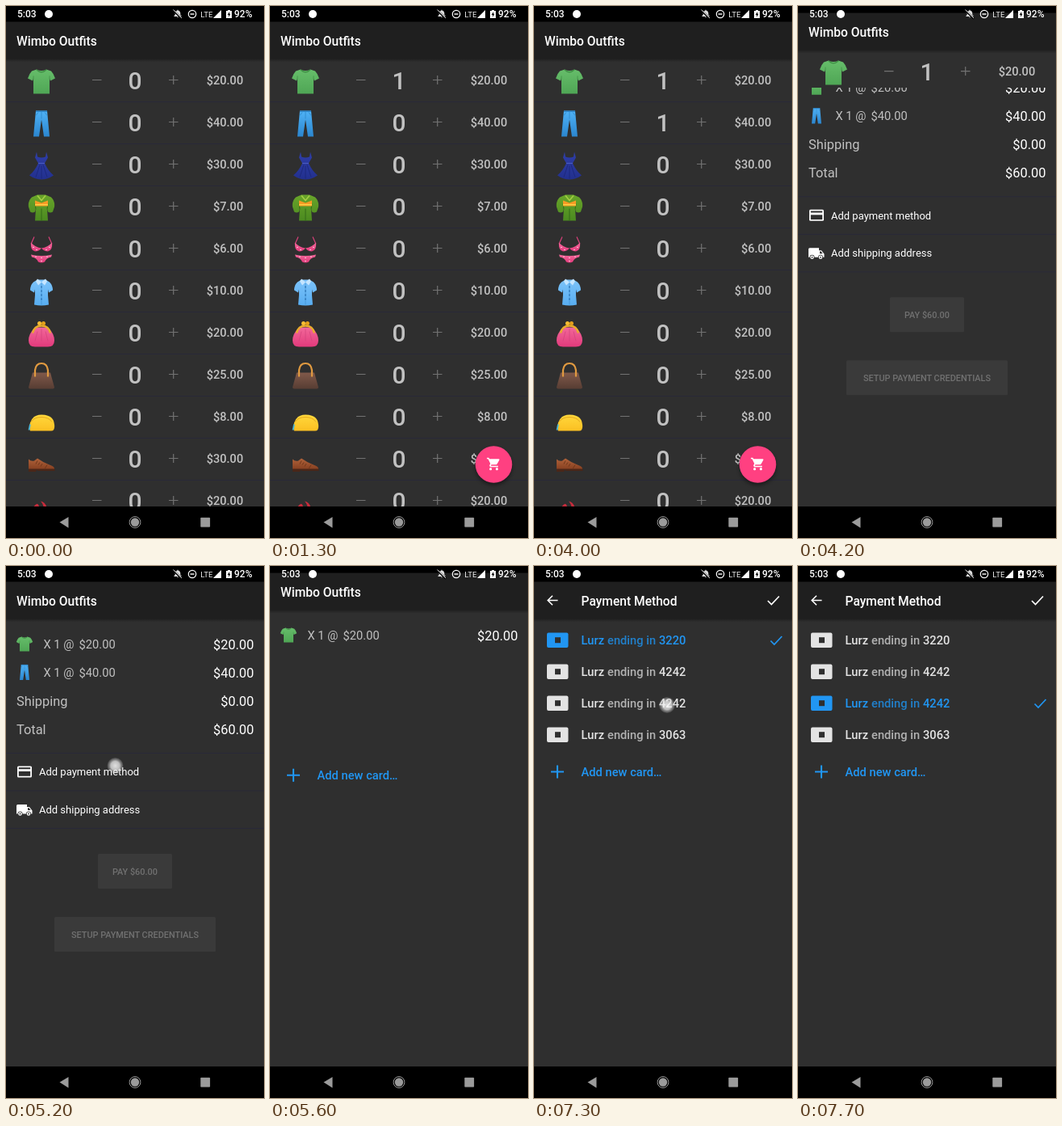
Recreate the animation shown at these times as an HTML page. Size 320 by 658 pixels, loop 8 s.

```html
<!DOCTYPE html>
<html lang="en">
<head>
<meta charset="utf-8">
<title>Shop checkout</title>
<style>
html, body { margin: 0; width: 100%; height: 100%; overflow: hidden; background: #000; }
svg { display: block; width: 100%; height: 100%; }
text { font-family: Roboto, sans-serif; white-space: pre; }
</style>
</head>
<body>
<svg id="stage" viewBox="0 0 320 658" xmlns="http://www.w3.org/2000/svg"></svg>
<script>
const SHOP = 'Wimbo Outfits', CARD = 'Lurz';
const BLUE = '#2196f3', RULE = '#292938';

// Markup helpers
const text = (x, y, s, size, fill = '#fff', weight = 400, anchor = 'start', extra = '') =>
  `<text x="${x}" y="${y}" font-size="${size}" fill="${fill}" font-weight="${weight}" text-anchor="${anchor}" ${extra}>${s}</text>`;
const rect = (x, y, w, h, fill, r = 0) =>
  `<rect x="${x}" y="${y}" width="${w}" height="${h}" rx="${r}" fill="${fill}"/>`;
const circle = (x, y, r, fill) => `<circle cx="${x}" cy="${y}" r="${r}" fill="${fill}"/>`;
const path = (d, fill) => `<path d="${d}" fill="${fill}"/>`;
const line = (d, stroke, w = 1) => `<path d="${d}" fill="none" stroke="${stroke}" stroke-width="${w}"/>`;
const at = (x, y, body, scale = 1) => `<g transform="translate(${x} ${y}) scale(${scale})">${body}</g>`;
const group = (id, body) => `<g id="${id}">${body}</g>`;
const rule = y => rect(0, y, 320, 1, RULE);

const grad = (id, a, b) =>
  `<linearGradient id="${id}" x2="0" y2="1"><stop stop-color="${a}"/><stop offset="1" stop-color="${b}"/></linearGradient>`;
const defs = `<defs>
  ${grad('green', '#66bd6a', '#4fa655')}${grad('denim', '#4fb2f6', '#2b86cf')}
  ${grad('navy', '#2f3ea8', '#22308e')}${grad('leaf', '#69a52a', '#4b8a20')}
  ${grad('sky', '#7cc3fa', '#58adf0')}${grad('rose', '#f2689a', '#e23a7c')}
  ${grad('brown', '#80594a', '#573d33')}${grad('gold', '#ffd83c', '#fbbf22')}
  ${grad('tan', '#b0623a', '#853f20')}
  <linearGradient id="shade" x2="0" y2="1"><stop stop-color="#000" stop-opacity=".3"/><stop offset="1" stop-color="#000" stop-opacity="0"/></linearGradient>
  <radialGradient id="touch">
    <stop stop-color="#fff" stop-opacity=".85"/><stop offset=".55" stop-color="#eee" stop-opacity=".75"/>
    <stop offset=".72" stop-color="#ddd" stop-opacity=".5"/><stop offset="1" stop-color="#ccc" stop-opacity=".12"/>
  </radialGradient>
  <filter id="soft" x="-50%" y="-50%" width="200%" height="200%"><feGaussianBlur stdDeviation="2.6"/></filter>
  <clipPath id="clipCart"><rect id="cutCart" width="320" height="658"/></clipPath>
  <clipPath id="clipPay"><rect id="cutPay" width="320" height="658"/></clipPath>
</defs>`;

// Clothes, each centred on 0,0
const tshirt = path('M-6-15Q0-12 6-15L12-13Q15-10 17-4L11-1 10-4V15H-10V-4L-11-1-17-4Q-15-10-12-13Z', 'url(#green)') +
  line('M-6-14.500Q0-9 6-14.500', '#3f9045', 1.3) + line('M-10-3V-7M10-3V-7', '#3f9045', .8);
const jeans = path('M-7-16H7L10 16H3L0-5-3 16H-10Z', 'url(#denim)') +
  line('M-7-15.300H7', '#2477b8', 1.2) + line('M0-15V-6M-7-10L-4-14M7-10L4-14', '#2f88ca', .8);
const dress = path('M-6-17L-5-11Q0-9 5-11L6-17 8-10 4-3Q8 6 15 12 8 17 0 17T-15 12Q-8 6-4-3L-8-10Z', 'url(#navy)') +
  line('M-4-3H4', '#4b5cc4', 1) + line('M-2-1L-7 14M2-1L7 14M0 0V16', '#1b2676', .8);
const kimono = path('M-5-16H5L12-13Q17-8 16-1L14 5Q11 7 8 5L7 1 8 16H-8L-7 1-8 5Q-11 7-14 5L-16-1Q-17-8-12-13Z', 'url(#leaf)') +
  line('M-5-15L0-9 5-15', '#a5cf45', 1.6) + line('M0 1V16M-7 2L-8-5M7 2L8-5', '#356b18', 1) +
  path('M-8-9L0-6 8-9V-2H-8Z', '#f79a24') + rect(-8, -4.5, 16, 1.4, '#ffcf45');
const bikini = line('M-9-16L-13-7M9-16L13-7', '#d8417a', 1.2) +
  path('M-13-9Q-8-3 0-2-3 2-8 2-14 1-13-9ZM13-9Q8-3 0-2 3 2 8 2 14 1 13-9Z', 'url(#rose)') +
  path('M-13 6Q0 9 13 6L12 9Q6 10 4 15 0 17-4 15-6 10-12 9Z', 'url(#rose)') +
  [[-10, -3], [-6, 0], [10, -3], [6, 0], [-7, 8.5], [0, 10], [7, 8.5], [0, 14]]
    .map(([x, y]) => circle(x, y, .8, '#ffd5e4')).join('');
const blouse = path('M-5-15H5L10-12Q14-8 14-2L9 1 8-3V4L9 16Q0 18-9 16L-8 4V-3L-9 1-14-2Q-14-8-10-12Z', 'url(#sky)') +
  path('M-5-16L0-12-4-8-7-13ZM5-16L0-12 4-8 7-13Z', '#c5e5ff') +
  line('M0-11V16', '#4190d0', .7) + [-6, -1, 4, 9].map(y => circle(0, y, .9, '#2c72b2')).join('');
const purse = path('M-8-8H8Q16 0 16 8T8 16H-8Q-16 16-16 8T-8-8Z', 'url(#rose)') +
  line('M-11-1Q-9-10 0-10T11-1', '#e8ab2c', 2.4) + line('M-5-3L-8 9M5-3L8 9M0-6V9', '#d2437c', .7) +
  circle(-2.5, -13, 2.5, '#f9bd32') + circle(2.5, -13, 2.5, '#e4a01c');
const handbag = line('M-8 0V-7Q-7-15.500 0-15.500T8-7V0', '#e09a40', 2.2) +
  path('M-11-4H11L16 14Q16 16 14 16H-14Q-16 16-16 14Z', 'url(#brown)') +
  line('M-8 1V-5M8 1V-5', '#e09a40', 2.2);
const pouch = path('M-14 16Q-16 12-14 6-11-4 0-4 15-4 16 8 17 16 12 16Z', 'url(#gold)') +
  line('M-13 5Q-9-1 0-1T13 5', '#e0a41c', .9) + line('M-14 8L-15.500 15', '#4ab6d8', 1.8);
const shoe = path('M-16-1Q-13 2-9 1L-5-2Q2 3 10 6 17 8 16 12H-16Z', 'url(#tan)') +
  path('M-16 11H16.500V13.500H-4L-6 12.500-7 14.500H-16Z', '#4a2618') +
  line('M-5 1L-7 5M-2 3L-4 6M1 4.500L-1 8M7 6L4 11', '#6d3519', .9);
const heel = path('M-9 5Q-6 1-4 3L-2 8H-10Z', '#c62c3c') + path('M-1-1Q4 0 6 5V8H3Q2 2-1-1Z', '#c62c3c');

const goods = [[tshirt, 20], [jeans, 40], [dress, 30], [kimono, 7], [bikini, 6], [blouse, 10],
  [purse, 20], [handbag, 25], [pouch, 8], [shoe, 30], [heel, 20]];
const money = n => '$' + n.toFixed(2);

const page = (body, bar) => rect(0, 0, 320, 658, '#2f2f2f') + body +
  rect(0, 19, 320, 46.5, '#1f1f1f') + rect(0, 65.5, 320, 4, 'url(#shade)') + bar + rect(0, 0, 320, 19.5, '#000');
const title = (x, s) => text(x, 49, s, 15.6, '#fff', 500);

// Shop list
const shopRow = ([icon, price], i) => {
  const y = 92 + 52 * i;
  return at(44, y + 1.5, icon) +
    line(`M107 ${y - .5}H118.500M202 ${y - .5}H213.500M207.700 ${y - 6}V${y + 5}`, '#727272', 1.2) +
    text(160, y + 11, '0', 30, '#c1c1c1', 500, 'middle', `id="count${i}"`) +
    text(294.2, y + 5, money(price), 14.6, '#c1c1c1', 500, 'end') + rule(y + 26);
};
const cart = path('M1 2V4H3L6.600 11.600 5.250 14Q4.500 16 7 17H19V15H7.400L8.100 13H15.550Q16.700 13 17.300 12L20.900 5.500Q21.200 4 20 4H5.200L4.300 2Z', '#fff') +
  circle(7, 20, 2, '#fff') + circle(17, 20, 2, '#fff');
const fab = `<g filter="url(#soft)" opacity=".45">${circle(0, 3, 22.5, '#000')}</g>` +
  circle(0, 0, 22.8, '#ff4081') + at(-9.3, -9.9, cart, .778);
const shop = page(goods.map(shopRow).join('') + group('fab', fab), title(13, SHOP));

// Checkout
const sumRow = (y, value) => text(307.5, y, money(value), 16.4, '#fff', 400, 'end');
const itemRow = (y, icon, price) => at(23, y - 6, icon, .6) + text(46.5, y - .5, 'X 1 @', 14.7, '#c1c1c1') +
  text(90.5, y - .5, money(price), 14.7, '#c1c1c1') + sumRow(y, price);
const button = (x, y, w, label) => rect(x, y, w, 43, '#3a3a3a', 1.5) +
  text(x + w / 2, y + 25.5, label, 10.9, '#717171', 500, 'middle');
const cardIcon = rect(14, 247.5, 18, 14, '#fff', 1.6) + rect(15.8, 249.2, 14.4, 2, '#2f2f2f') + rect(15.8, 254, 14.4, 5.8, '#2f2f2f');
const truck = path('M13 296.500Q13 295 14.500 295H26V298H29L32.500 302.500V306.500H13Z', '#fff') +
  path('M27 299.300H28.600L30.600 302H27Z', '#2f2f2f') +
  [17.5, 28].map(x => circle(x, 306.5, 3, '#2f2f2f') + circle(x, 306.5, 2.3, '#fff') + circle(x, 306.5, .9, '#2f2f2f')).join('');
const checkout = page(
  itemRow(102.5, tshirt, 20) + itemRow(137.5, jeans, 40) +
  text(13, 172.5, 'Shipping', 16.4, '#c1c1c1') + sumRow(172.5, 0) +
  text(13, 207.5, 'Total', 16.4, '#c1c1c1') + sumRow(207.5, 60) +
  [231, 277.5, 324].map(rule).join('') +
  cardIcon + text(41, 259.3, 'Add payment method', 13) +
  truck + text(41, 306, 'Add shipping address', 13) +
  button(114, 356, 92, 'PAY $60.00') + button(60, 434, 200, 'SETUP PAYMENT CREDENTIALS'), title(13, SHOP));

// Payment methods
const tick = (x, y, color) => line(`M${x - 7} ${y + .5}L${x - 2.500} ${y + 5}L${x + 7} ${y - 5}`, color, 1.7);
const cardFace = (y, digits, main, dim) =>
  rect(16, y - 9.5, 26.5, 18.5, main, 2) + rect(26, y - 3.8, 7, 7, '#2f2f2f') +
  text(58.5, y + 5.3, CARD, 14.7, main, 500) + text(91, y + 5.3, 'ending in', 14.7, dim, 500) +
  text(155, y + 5.3, digits, 14.7, main, 500);
const cardRow = (digits, i) => {
  const y = 92 + 39 * i;
  return group('off' + i, cardFace(y, digits, '#e3e3e3', '#b2b2b2')) +
    group('on' + i, cardFace(y, digits, BLUE, '#2180cb') + tick(300.5, y, BLUE));
};
const payment = page(
  group('cards', ['3220', '4242', '4242', '3063'].map(cardRow).join('')) +
  line('M21 254.500H37M29 246.500V262.500', BLUE, 2.1) + text(58.5, 260, 'Add new card…', 14.7, BLUE, 500),
  line('M29.500 42.500H17.500M23 36.800L17.200 42.500 23 48.200', '#fff', 1.6) +
  title(58.5, 'Payment Method') + tick(297, 42.5, '#fff'));

// System bars
const system = text(14, 14, '5:03', 12, '#fff', 500) + circle(53, 10, 5, '#fff') +
  path('M208.500 13V12L209.700 11V8.500Q210 6 212.500 5.500V4.800H213.500V5.500Q216 6 216.300 8.500V11L217.500 12V13ZM212 13.500H214Q213 15.500 212 13.500Z', '#ddd') +
  line('M207 5L218 15.500', '#000', 2.4) + line('M207.500 4.500L218 15', '#ddd', 1) +
  '<circle cx="231" cy="10" r="4.700" fill="none" stroke="#fff" stroke-width="1.200"/>' + rect(228.5, 9.3, 5, 1.4, '#fff') +
  text(241.3, 13.5, 'LTE', 9.6, '#eee') + path('M257 15H267V5Z', '#fff') +
  path('M273 6H275V5H278V6H280V15H273Z', '#fff') + path('M277.200 7L274.700 11H276.200V13.700L278.500 9.700H277.200Z', '#000') +
  text(283, 14, '92%', 12, '#fff', 500) +
  rect(0, 619, 320, 39, '#000') + path('M66.500 638.500L77.500 632V645.500Z', '#9b9b9b') +
  circle(160, 638.5, 5.2, '#9b9b9b') +
  '<circle cx="160" cy="638.500" r="6.900" fill="none" stroke="#9b9b9b"/>' + rect(241.3, 632.7, 11.8, 11.8, '#9b9b9b', .8);

const stage = document.getElementById('stage');
stage.innerHTML = defs + group('shop', shop) +
  `<g clip-path="url(#clipCart)">${group('cart', checkout)}</g>` +
  `<g clip-path="url(#clipPay)">${group('pay', payment)}</g>` +
  system + group('dot', circle(0, 0, 10, 'url(#touch)'));

const $ = id => document.getElementById(id);
const set = (id, name, value) => $(id).setAttribute(name, value);
const move = (id, x, y, scale = 1) => set(id, 'transform', `translate(${x} ${y}) scale(${scale})`);

// Last value whose time has come
const pick = (steps, t) => steps.reduce((v, [time, next]) => t >= time ? next : v, 0);
const opening = start => [.4, .84, .95, .99, 1].map((p, i) => [start + 100 * i, p]);
const openCart = opening(4100), openPay = opening(5500);
const fabSize = [[1200, .6], [1300, 1]];
const cardsIn = [[6000, .5], [6100, 1]];
const chosen = [[7500, .35], [7600, .75], [7700, 1]];
const taps = [[1000, 207, 92], [2200, 207, 144], [3700, 277, 567], [5200, 135.5, 247], [7300, 165, 172]];
const tapFade = [1, .9, .45];

function slide(id, cut, p) {
  set(id, 'visibility', p ? 'visible' : 'hidden');
  move(id, 0, 27 * (1 - p));
  set(cut, 'y', 631 * (1 - p));
}

function render(now) {
  const t = Math.floor(now % 8000 / 100) * 100;
  $('count0').textContent = t >= 1200 ? 1 : 0;
  $('count1').textContent = t >= 2400 ? 1 : 0;
  move('fab', 277.5, 567, pick(fabSize, t));

  const p = pick(openCart, t), q = pick(openPay, t);
  slide('cart', 'cutCart', p);
  slide('pay', 'cutPay', q);
  move('shop', 0, p < 1 ? -13 * p : 0);
  if (q > 0 && q < 1) move('cart', 0, -13 * q);

  set('cards', 'opacity', pick(cardsIn, t));
  const c = pick(chosen, t);
  [1 - c, 0, c, 0].forEach((on, i) => {
    set('on' + i, 'opacity', on);
    set('off' + i, 'opacity', 1 - on);
  });

  const tap = taps.find(([start]) => t >= start && t < start + 300);
  set('dot', 'opacity', tap ? tapFade[(t - tap[0]) / 100] : 0);
  if (tap) move('dot', tap[1], tap[2]);
}

const begin = performance.now();
function tickFrame() {
  render(performance.now() - begin);
  requestAnimationFrame(tickFrame);
}
tickFrame();
</script>
</body>
</html>
```
